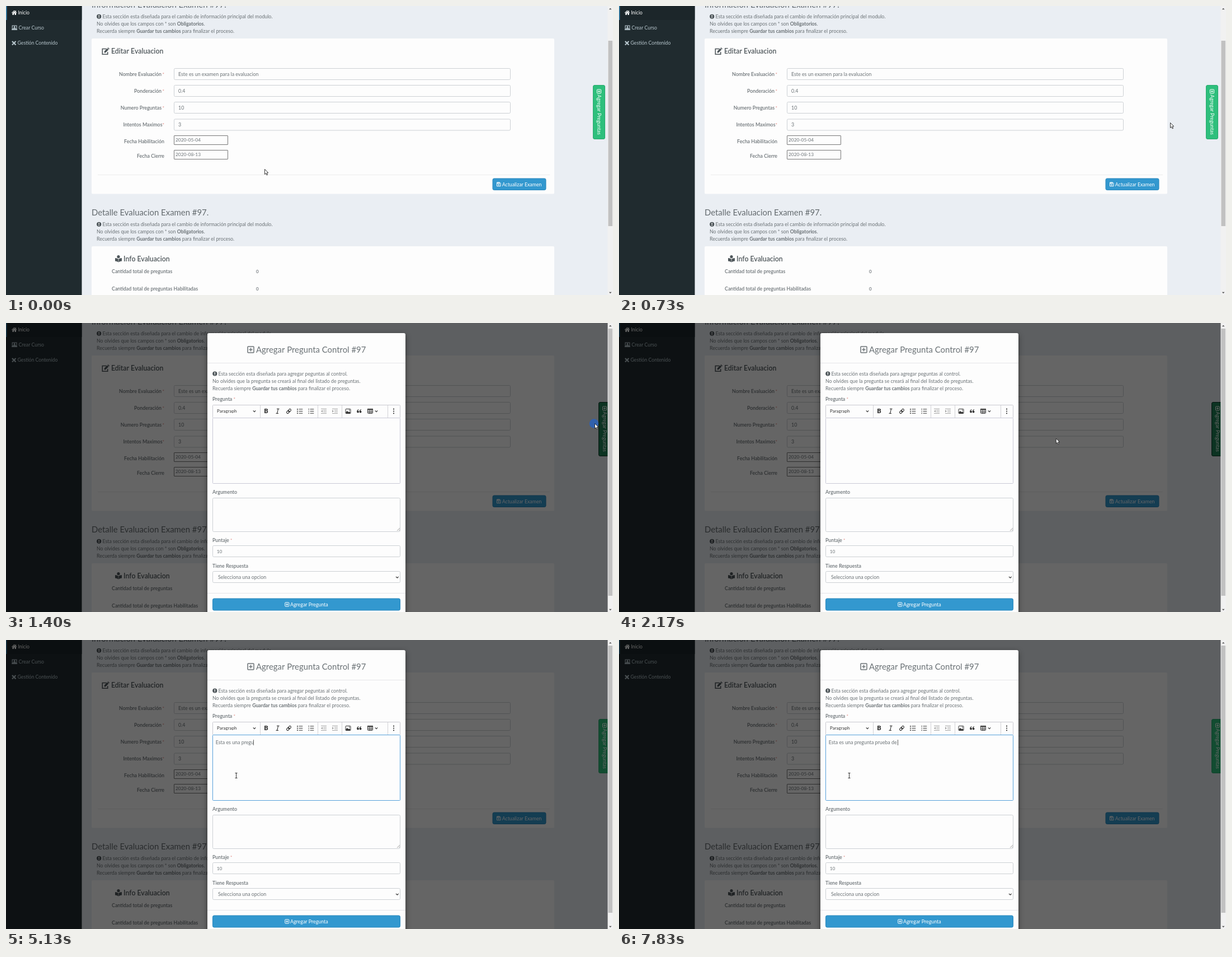
An HTML page with a canvas that plays this animation: 1085x516 px, repeating every 8 s.

```html
<!DOCTYPE html>
<html lang="es">
<head>
<meta charset="utf-8">
<title>Editar Evaluacion</title>
<style>
  html, body { margin: 0; width: 100%; height: 100%; overflow: hidden; background: #eaeef3; }
  canvas { display: block; width: 1085px; height: 516px; }
</style>
</head>
<body>
<canvas id="stage"></canvas>
<script>
const W = 1085, H = 516, LOOP = 8000;
const INK = '#6b7276', DARK = '#4e565a', PAPER = '#fdfdfd', EDGE = '#ccd0d4', BLUE = '#3398cf';
const BODY = '8.85px', BOLD = '700 8.7px', LABEL = '600 8.85px';
const OPEN = 1400, FOCUS = 2850;

const canvas = document.getElementById('stage');
const ratio = window.devicePixelRatio || 1;
canvas.width = W * ratio;
canvas.height = H * ratio;
const c = canvas.getContext('2d');

// Drawing helpers
function text(s, x, y, font = BODY, color = INK, align = 'left') {
  c.font = font + ' Lato, sans-serif';
  c.fillStyle = color;
  c.textAlign = align;
  c.fillText(s, x, y);
}

function runs(x, y, ...parts) {
  parts.forEach((s, i) => {
    text(s, x, y, i % 2 ? BOLD : BODY);
    x += c.measureText(s).width;
  });
}

function fill(x, y, w, h, color, radius = 0) {
  c.fillStyle = color;
  c.beginPath();
  c.roundRect(x, y, w, h, radius);
  c.fill();
}

function box(x, y, w, h, color = EDGE, radius = 2, back = PAPER) {
  c.beginPath();
  c.roundRect(x + .5, y + .5, w - 1, h - 1, radius);
  c.fillStyle = back;
  c.fill();
  c.strokeStyle = color;
  c.lineWidth = 1;
  c.stroke();
}

function trace(points, close) {
  c.beginPath();
  for (let i = 0; i < points.length; i += 2) c.lineTo(points[i], points[i + 1]);
  if (close) c.closePath();
}

function poly(color, ...points) {
  trace(points, true);
  c.fillStyle = color;
  c.fill();
}

function line(color, width, ...points) {
  trace(points);
  c.strokeStyle = color;
  c.lineWidth = width;
  c.stroke();
}

function disc(x, y, r, color) {
  c.fillStyle = color;
  c.beginPath();
  c.arc(x, y, r, 0, 7);
  c.fill();
}

function at(x, y, draw) {
  c.save();
  c.translate(x, y);
  draw();
  c.restore();
}

// Icons
function alertIcon(x, y) {
  disc(x, y, 4.1, DARK);
  fill(x - .7, y - 2.6, 1.4, 3.1, PAPER);
  fill(x - .7, y + 1.2, 1.4, 1.4, PAPER);
}

function plusIcon(x, y, size, color, width) {
  const h = size / 2, q = size / 4;
  c.strokeStyle = color;
  c.lineWidth = width;
  c.beginPath();
  c.roundRect(x - h + width / 2, y - h + width / 2, size - width, size - width, 1);
  c.stroke();
  line(color, width, x - q, y, x + q, y);
  line(color, width, x, y - q, x, y + q);
}

function chevron(x, y, size = 2.2, color = '#333') {
  line(color, 1.2, x - size, y - size / 2, x, y + size / 2, x + size, y - size / 2);
}

function homeIcon() {
  poly('#fff', 0, 4.5, 4.7, .3, 6.8, 2.2, 6.8, .8, 8, .8, 8, 3.3, 9.4, 4.5, 8.8, 5.2, 4.7, 1.7, .6, 5.2);
  poly('#fff', 1.5, 5.1, 4.7, 2.4, 8, 5.1, 8, 8.4, 5.6, 8.4, 5.6, 5.8, 3.9, 5.8, 3.9, 8.4, 1.5, 8.4);
}

function laptopIcon() {
  const color = '#b8c7ce';
  c.strokeStyle = color;
  c.lineWidth = 1.1;
  c.strokeRect(1.2, .6, 7.8, 5.6);
  disc(5.1, 2.4, 1.1, color);
  fill(3.2, 3.8, 3.8, 1.8, color, 1);
  fill(0, 6.8, 10.2, 1.6, color, .7);
}

function toolsIcon() {
  line('#b8c7ce', 2.3, 1, 1, 7.5, 7.5);
  line('#b8c7ce', 2.1, 7.5, 1, 1, 7.5);
  line('#202b2f', .5, 2.4, 5.2, 3.5, 6.2);
}

function editIcon() {
  line(DARK, 1.6, 8, 2.5, 1, 2.5, 1, 12.2, 10.4, 12.2, 10.4, 8);
  poly(DARK, 4.2, 9.5, 4.5, 6.8, 9.6, 1.6, 12, 4, 6.8, 9.2);
  poly(DARK, 10.2, 1, 11.2, .1, 13.7, 2.5, 12.6, 3.4);
}

function readerIcon() {
  disc(6, 2.7, 2.6, DARK);
  poly(DARK, 0, 5.1, 3, 5.5, 5.7, 6.8, 5.7, 12.4, 3, 11, 0, 10.6);
  poly(DARK, 12, 5.1, 9, 5.5, 6.3, 6.8, 6.3, 12.4, 9, 11, 12, 10.6);
}

function saveIcon() {
  line('#fff', 1, .5, .5, 5.5, .5, 7, 2, 7, 7.2, .5, 7.2, .5, .5);
  c.strokeRect(2, .8, 3, 2);
  disc(3.7, 5, 1.1, '#fff');
}

// Page behind the dialog
function sidebar() {
  fill(0, 0, 135.5, H, '#202b2f');
  fill(0, 0, 135.5, 25, '#1c262a');
  fill(0, 0, 1.5, 25, '#3c8dbc');
  at(10, 7.5, homeIcon);
  at(10, 34.5, laptopIcon);
  at(10, 62, toolsIcon);
  text('Inicio', 21.5, 15, '8.7px', '#fff');
  text('Crear Curso', 22.5, 42, '8.7px', '#b8c7ce');
  text('Gestión Contenido', 20.5, 69, '8.7px', '#b8c7ce');
}

function intro(title, y) {
  text(title, 153, y, '14.9px', '#646b6f');
  alertIcon(166.2, y + 15.8);
  text('Esta sección esta diseñada para el cambio de información principal del modulo.', 172.4, y + 19);
  runs(162, y + 32, 'No olvides que los campos con * son ', 'Obligatorios', '.');
  runs(162, y + 45, 'Recuerda siempre ', 'Guardar tus cambios', ' para finalizar el proceso.');
}

function field(label, value, y, labelEnd = 278) {
  text(label, labelEnd, y + 13.5, LABEL, INK, 'right');
  text('*', 282.8, y + 13.5, '8px', '#dd7b74', 'right');
  box(300, y, 602, 21);
  text(value, 308, y + 13.8);
}

function dateField(label, value, y, labelY) {
  text(label, 283, labelY, LABEL, INK, 'right');
  box(300, y, 97, 17, '#777', .5);
  text(value, 303, y + 11.3, '8.4px');
}

function page() {
  fill(0, 0, W, H, '#eaeef3');
  sidebar();
  intro('Información Evaluacion Examen #97.', 3);

  fill(153, 58, 827, 277.5, PAPER, 2);
  at(171.3, 74, editIcon);
  text('Editar Evaluacion', 188, 84.6, '600 12.3px', DARK);
  field('Nombre Evaluación', 'Este es un examen para la evaluacion', 111);
  field('Ponderación', '0.4', 141);
  field('Numero Preguntas', '10', 171);
  field('Intentos Maximos', '3', 201.5, 279.5);
  dateField('Fecha Habilitación', '2020-05-04', 231, 245);
  dateField('Fecha Cierre', '2020-08-13', 257, 271);
  fill(164, 301, 808, 1, '#ececec');
  box(869.5, 307.5, 96, 21.5, '#2a88bd', 2.5, BLUE);
  at(877, 314.5, saveIcon);
  text('Actualizar Examen', 886.7, 321.5, '8.75px', '#fff');

  intro('Detalle Evaluacion Examen #97.', 374);
  fill(153, 429, 827, 100, PAPER, 2);
  at(195, 445, readerIcon);
  text('Info Evaluacion', 210, 455.7, '600 12.3px', DARK);
  text('Cantidad total de preguntas', 189, 476.6, LABEL);
  text('Cantidad total de preguntas Habilitadas', 189, 508, LABEL);
  text('0', 447, 476.6, '600 8px');
  text('0', 447, 508, '600 8px');
}

function sideButton(x, back, border) {
  box(x, 141, 22, 97, border, 2.5, back);
  at(x + 11, 152.5, () => {
    c.rotate(Math.PI / 2);
    plusIcon(0, 0, 8, '#fff', 1);
    text('Agregar Preguntas', 5.8, 3, BODY, '#fff');
  });
}

function scrollbar(top, height) {
  fill(1075.5, 0, 9.5, H, '#f1f1f1');
  fill(1076.5, top, 7.5, height, '#c1c1c1');
  poly('#555', 1077.8, 6.2, 1080.2, 3.8, 1082.6, 6.2);
  poly('#555', 1077.8, 510.8, 1080.2, 513.2, 1082.6, 510.8);
}

// Dialog
function listIcon(x, numbered) {
  for (let i = 0; i < 3; i++) {
    const y = 153.9 + i * 3.6;
    fill(x - 1.5, y - .5, 6.8, 1, '#333');
    if (numbered) fill(x - 4.4, y - 1.1, .9, 2.2, '#333');
    else disc(x - 4, y, 1, '#333');
  }
}

function indentIcon(x, dir) {
  const color = '#a5a5a5';
  for (const y of [152.8, 161]) fill(x - 5, y, 10, 1, color);
  for (const y of [155.5, 158.3]) fill(x - 1, y, 6, 1, color);
  poly(color, x - 3.5 - dir * 1.5, 155, x - 3.5 + dir * 1.5, 157.4, x - 3.5 - dir * 1.5, 159.8);
}

function linkIcon(x, y) {
  at(x, y, () => {
    c.rotate(-Math.PI / 4);
    c.strokeStyle = '#333';
    c.lineWidth = 1.1;
    for (const dx of [-4.8, -.7]) {
      c.beginPath();
      c.roundRect(dx, -1.9, 5.5, 3.8, 1.9);
      c.stroke();
    }
  });
}

function toolbar() {
  box(369, 146, 336, 24, '#c9c9d0', 1);
  text('Paragraph', 377, 160, '8px', '#333');
  chevron(444, 157.5);
  for (const x of [454, 557, 600, 682]) fill(x, 147, 1, 22, '#d2d2d6');
  text('B', 465, 161.3, '900 11px', '#333', 'center');
  line('#333', 1.1, 484, 153.3, 488.5, 153.3);
  line('#333', 1.1, 486.6, 153.3, 484.6, 161.4);
  line('#333', 1.1, 482.5, 161.4, 487, 161.4);
  linkIcon(505.5, 157.5);
  listIcon(525);
  listIcon(545, true);
  indentIcon(568, -1);
  indentIcon(588, 1);
  box(606.5, 153, 10, 9, '#333', 1);
  poly('#333', 607, 161, 609.7, 156.5, 612, 159.5, 613.5, 157.8, 616, 161);
  disc(613.8, 155.6, .9, '#333');
  for (const x of [627.2, 631.7]) {
    disc(x + 1.9, 158.5, 1.9, '#333');
    line('#333', 1.1, x + .6, 158.5, x + 1, 156, x + 3.2, 154.4);
  }
  box(646, 153, 10, 9, '#333', 1);
  fill(646, 153, 10, 2, '#333');
  for (const x of [649, 652.2]) fill(x, 153, .9, 9, '#333');
  for (const y of [156.7, 159.2]) fill(646, y, 10, .8, '#333');
  chevron(662, 157.5);
  for (const y of [153.7, 157.5, 161.3]) disc(693, y, 1.1, '#333');
}

// Each entry: time of the first key, gap between keys, letters
const strokes = [
  [3070, 92, 'Esta e'], [3700, 70, 's '], [4070, 165, 'una'], [4600, 85, ' pr'],
  [4930, 100, 'egu'], [5300, 0, 'n'], [5500, 70, 'ta'], [5730, 0, ' '],
  [6700, 0, 'p'], [6870, 110, 'rueb'], [7370, 115, 'a d'], [7770, 60, 'e ']
];
const keys = strokes.flatMap(([start, gap, s]) => [...s].map((ch, i) => [start + i * gap, ch]));

function editor(t) {
  const focused = t >= FOCUS;
  box(369, 169, 336, 118, focused ? '#55a0da' : '#c9c9d6', 1);
  if (!focused) return;
  const done = keys.filter(([time]) => time <= t);
  const typed = done.map(k => k[1]).join('');
  const last = done.length ? done[done.length - 1][0] : FOCUS;
  text(typed, 374.7, 186);
  if ((t - last) % 1060 < 530) fill(Math.floor(374.7 + c.measureText(typed).width), 178, 1, 10, '#666');
}

function dialogLabel(s, y, required) {
  text(s, 369, y, LABEL);
  if (required) text('*', 369 + c.measureText(s + ' ').width, y, '8px', '#dd7b74');
}

function dialog(t) {
  c.save();
  c.shadowColor = 'rgba(0,0,0,.5)';
  c.shadowBlur = 10 * ratio;
  c.shadowOffsetY = 3 * ratio;
  fill(360, 18, 354, 520, PAPER, 3);
  c.restore();
  plusIcon(437.5, 47.5, 12.5, INK, 1.5);
  text('Agregar Pregunta Control #97', 447, 53, '14.9px');
  fill(360, 71, 354, 1, '#e5e5e8');
  alertIcon(373.3, 90.5);
  text('Esta sección esta diseñada para agregar peguntas al control.', 379.4, 93.6);
  text('No olvides que la pregunta se creará al final del listado de preguntas.', 369, 106.6);
  runs(369, 119.6, 'Recuerda siempre ', 'Guardar tus cambios', ' para finalizar el proceso.');
  dialogLabel('Pregunta', 139, true);
  toolbar();
  editor(t);

  dialogLabel('Argumento', 305.2);
  box(369, 312, 336, 61);
  line('#888', .8, 699, 371, 704, 366);
  line('#888', .8, 702, 371, 704, 369);
  dialogLabel('Puntaje', 390.5, true);
  box(369, 397, 336, 21);
  text('10', 376.7, 411, '8.2px');
  dialogLabel('Tiene Respuesta', 437);
  box(369, 443, 336, 21);
  text('Selecciona una opcion', 379, 457);
  chevron(699.3, 454, 2.3);
  fill(360, 482, 354, 1, '#e5e5e8');
  box(369, 491.5, 336, 22, '#2a88bd', 2.5, BLUE);
  plusIcon(502.3, 502.5, 8, '#fff', 1);
  text('Agregar Pregunta', 508, 505.6, BODY, '#fff');
}

// Pointer stops: time, x, y
const path = [[0, 462, 291], [730, 985, 208], [1030, 1052, 179], [1700, 1052, 179], [2750, 411, 242], [LOOP, 411, 242]];

function pointerAt(t) {
  const i = path.findIndex(p => p[0] > t);
  const [t0, x0, y0] = path[i - 1], [t1, x1, y1] = path[i];
  const u = (t - t0) / (t1 - t0), k = u * u * (3 - 2 * u);
  return [x0 + (x1 - x0) * k, y0 + (y1 - y0) * k];
}

function pointer(t, x, y) {
  const halo = 'rgba(32,98,205,.7)';
  if (t >= 1300 && t < 1500) disc(1051, 179.5, 8.3, halo);
  if (t >= 2830 && t < 3030) disc(411, 242, 8.3, halo);
  const overText = t >= OPEN && x > 369 && x < 705 && y > 169 && y < 287;
  at(x, y, () => {
    if (overText) {
      line('#333', 1, .5, -4, .5, 4);
      line('#333', 1, -1.5, -4.5, 2.5, -4.5);
      line('#333', 1, -1.5, 4.5, 2.5, 4.5);
      return;
    }
    poly('#fff', .5, .5, .5, 9.6, 2.6, 7.6, 4.1, 11, 5.6, 10.3, 4.1, 7, 6.8, 6.8);
    c.strokeStyle = '#222';
    c.lineWidth = .9;
    c.stroke();
  });
}

function draw(t) {
  const [x, y] = pointerAt(t);
  const open = t >= OPEN;
  const pressed = t >= 1300 && t < FOCUS;
  const hover = !open && x > 1049;
  c.setTransform(ratio, 0, 0, ratio, 0, 0);
  page();
  const back = pressed ? '#1e7f55' : hover ? '#239466' : '#2ebf7c';
  sideButton(open ? 1059 : 1049, back, pressed ? '#0d3625' : '#27a96d');
  if (open) {
    fill(0, 0, W, H, 'rgba(0,0,0,.6)');
    scrollbar(10, 477);
    dialog(t);
  } else {
    scrollbar(62, 331);
  }
  pointer(t, x, y);
}

const begin = performance.now();
function tick() {
  draw((performance.now() - begin) % LOOP);
  requestAnimationFrame(tick);
}
tick();
</script>
</body>
</html>
```
